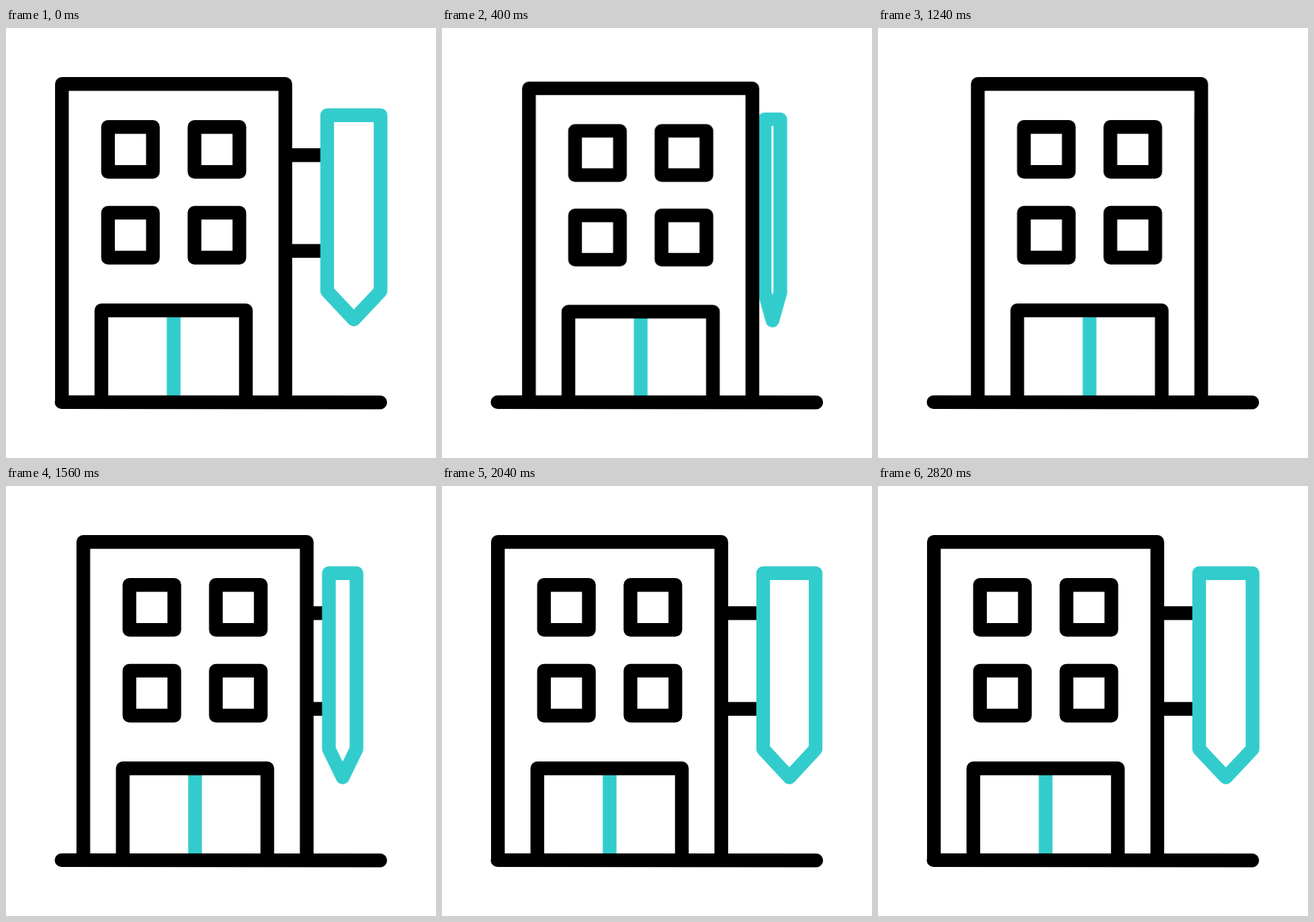
Write an HTML page that moves like this. It is 640x640 px and loops after 3600 ms.

```html
<!DOCTYPE html>
<html lang="en">
<head>
<meta charset="utf-8">
<title>Building with sign</title>
<style>
  html, body { margin: 0; width: 100%; height: 100%; overflow: hidden; background: #fff; }
  svg {
    display: block; width: 100%; height: 100%;
    fill: none; stroke: #000; stroke-width: 20.4; stroke-linejoin: round;
  }
  .teal { stroke: #33cccc; }
  .shift, .squash, .bracket, .sign { animation: 3600ms linear infinite; }
  .shift { animation-name: shift; }
  .squash { animation-name: squash; transform-origin: 0 557px; }
  .bracket { animation-name: bracket; transform-origin: 415.7px 0; }
  .sign { animation-name: sign; }

  /* Fold away 0-680 ms, unfold 1230-1740 ms, sign settles until 2830 ms. */
  @keyframes shift {
    0% { transform: translateX(0); animation-timing-function: cubic-bezier(.167, .05, .667, 1); }
    18.889% { transform: translateX(65.4px); }
    34.167% { transform: translateX(65.4px); animation-timing-function: cubic-bezier(.45, 0, .85, .9); }
    48.333%, 100% { transform: translateX(0); }
  }
  @keyframes squash {
    0% { transform: scaleY(1); animation-timing-function: ease-in-out; }
    9.444% { transform: scaleY(.985); animation-timing-function: ease-in-out; }
    18.889%, 100% { transform: scaleY(1); }
  }
  @keyframes bracket {
    0% { transform: scaleX(1); animation-timing-function: cubic-bezier(.167, .05, .667, 1); }
    18.889% { transform: scaleX(.001); }
    34.167% { transform: scaleX(.001); animation-timing-function: cubic-bezier(.45, 0, .85, .9); }
    48.333%, 100% { transform: scaleX(1); }
  }
  @keyframes sign {
    0% {
      d: path("M478 129.8H557.5V391.5L517.7 433.7L478 391.5Z");
      animation-timing-function: cubic-bezier(.167, .05, .667, 1);
    }
    18.889% { d: path("M415.7 129.8H415.7V391.5L415.7 433.7L415.7 391.5Z"); }
    34.167% {
      d: path("M415.7 129.8H415.7V391.5L415.7 433.7L415.7 391.5Z");
      animation-timing-function: cubic-bezier(.44, 0, .84, .915);
    }
    48.333% { d: path("M478 129.8H555.5V391.5L516.7 433.7L478 391.5Z"); }
    78.611%, 100% { d: path("M478 129.8H557.5V391.5L517.7 433.7L478 391.5Z"); }
  }
</style>
</head>
<body>
<svg viewBox="0 0 640 640">
  <defs>
    <rect id="pane" width="66.8" height="66.8"/>
  </defs>
  <g class="shift">
    <g class="squash">
      <path class="bracket" d="M415.7 189.2H478M415.7 331.8H478"/>
      <path class="sign teal" d="M478 129.8H557.5V391.5L517.7 433.7L478 391.5Z"/>
      <path class="teal" d="M249.5 425V552"/>
      <path d="M83.2 557V83.2H415.7V557"/>
      <use href="#pane" x="151.8" y="147.3"/>
      <use href="#pane" x="280.5" y="147.3"/>
      <use href="#pane" x="151.8" y="274.9"/>
      <use href="#pane" x="280.5" y="274.9"/>
      <path d="M141.9 557V420.3H357V557"/>
    </g>
  </g>
  <path d="M82.7 556.9L557 557.3" stroke-linecap="round"/>
</svg>
</body>
</html>
```
